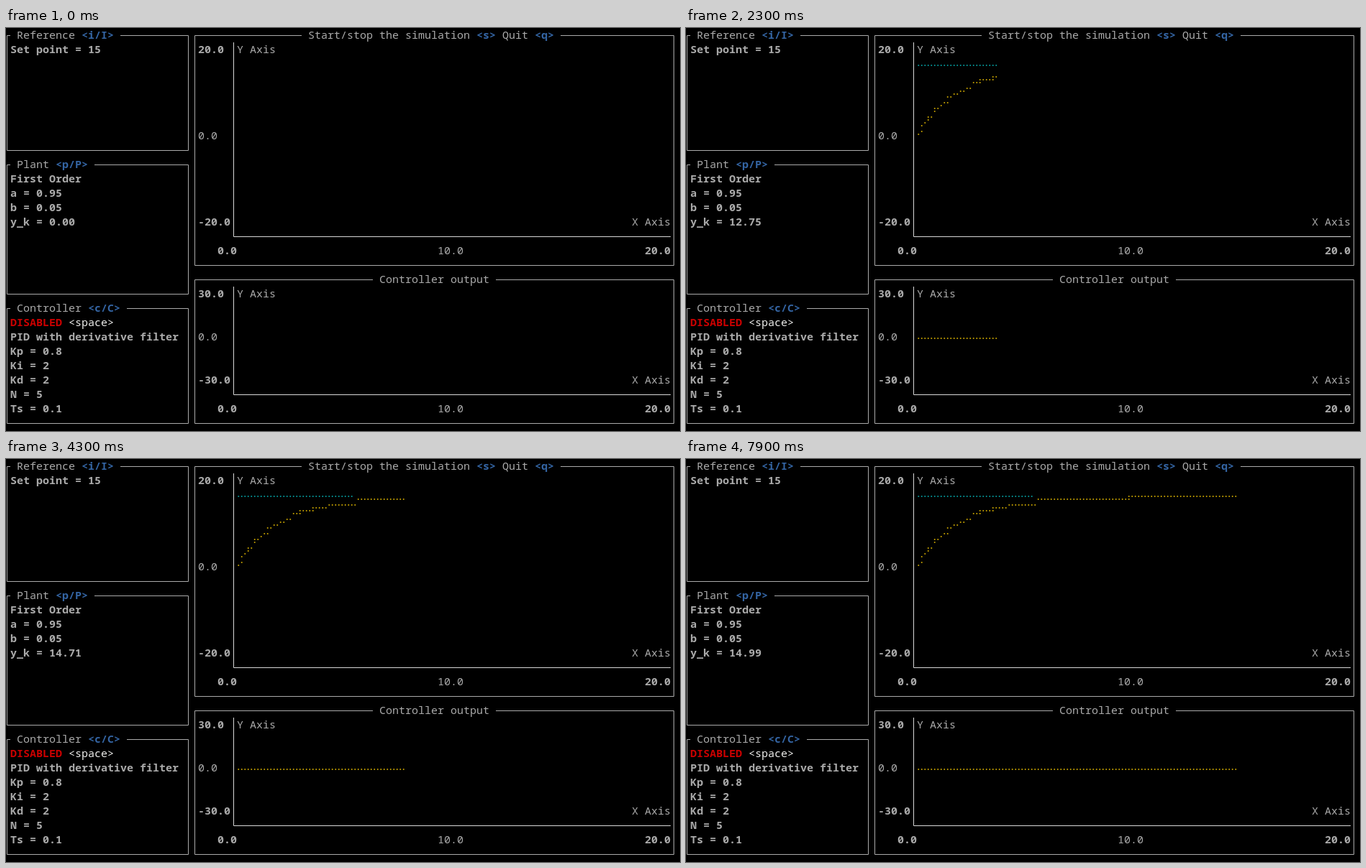
Recreate the animation shown at these times as an HTML page. Size 937 by 561 pixels, loop 8000 ms.

```html
<!DOCTYPE html>
<html lang="en">
<head>
<meta charset="utf-8">
<title>Control simulation</title>
<style>
html, body { margin: 0; width: 100%; height: 100%; overflow: hidden; background: #000; }
svg { display: block; }
text { font: 15px "Noto Sans Mono", "DejaVu Sans Mono", monospace; fill: #aaa; white-space: pre; }
.b { font-weight: 600; }
.blue { fill: #3465a4; font-weight: 600; }
.red { fill: #c00; font-weight: 600; }
.white { fill: #eeeeec; }
path { fill: none; stroke: #aaa; }
.axis { stroke: #d8d8d8; }
.dots { stroke-width: 2.1; stroke-linecap: round; }
</style>
</head>
<body>
<svg id="stage" width="937" height="561" viewBox="0 0 937 561"></svg>
<script>
const CW = 9, CH = 20, LOOP = 8000, START = 500, STEP = 100;
const stage = document.getElementById('stage');
const colX = c => c * CW - 3;

function add(tag, cls, attrs) {
  const el = document.createElementNS(stage.namespaceURI, tag);
  if (cls) el.setAttribute('class', cls);
  for (const key in attrs) el.setAttribute(key, attrs[key]);
  return stage.appendChild(el);
}

function label(col, row, str, cls) {
  const el = add('text', cls, { x: colX(col), y: row * CH + 15 });
  el.textContent = str;
  return el;
}

// Title parts in angle brackets are key hints
function title(col, row, str) {
  for (const part of str.split(/(<[^>]+>)/)) {
    if (part.trim()) label(col, row, part, part[0] === '<' ? 'blue' : '');
    col += part.length;
  }
}

function panel(c0, r0, c1, r1, str, at) {
  const x0 = colX(c0) + 4.5, x1 = colX(c1) + 4.5;
  const y0 = r0 * CH + 10.5, y1 = r1 * CH + 10.5;
  add('path', '', {
    d: `M${colX(at - 1)} ${y0}H${x0}V${y1}H${x1}V${y0}H${colX(at + str.length + 1)}`
  });
  title(at, r0, str);
}

// Braille plot: two by four dots in each character cell
function chart(top, rows, max) {
  const mid = top + (rows - 1) / 2, low = top + rows - 1;
  const y = (low + 1) * CH + 10.5;
  add('path', 'axis', { d: `M316.5 ${top * CH}V${y}H924` });
  label(30, top, max + '.0', 'b');
  label(30, mid, '0.0');
  label(30, low, `-${max}.0`, 'b');
  label(36, top, 'Y Axis');
  label(97, low, 'X Axis');
  label(33, low + 2, '0.0', 'b');
  label(67, low + 2, '10.0');
  label(99, low + 2, '20.0', 'b');
  return {
    dot: (i, v) => ({
      col: Math.round(i * 0.1 * 133 / 20),
      row: Math.round((max - v) * (rows * 4 - 1) / (2 * max))
    }),
    draw: dots => dots.map(({ col, row }) => {
      const x = colX(36) + 2.25 + col * 4.5;
      const y = (top + (row >> 2)) * CH + 4 + (row & 3) * 4;
      return `M${x} ${y}h0`;
    }).join('')
  };
}

panel(0, 0, 28, 8, 'Reference <i/I>', 2);
panel(0, 9, 28, 18, 'Plant <p/P>', 2);
panel(0, 19, 28, 27, 'Controller <c/C>', 2);
panel(29, 0, 103, 16, 'Start/stop the simulation <s> Quit <q>', 47);
panel(29, 17, 103, 27, 'Controller output', 58);

label(1, 1, 'Set point = 15', 'b');
['First Order', 'a = 0.95', 'b = 0.05'].forEach((s, i) => label(1, 10 + i, s, 'b'));
const state = label(1, 13, '', 'b');
label(1, 20, 'DISABLED', 'red');
label(10, 20, '<space>', 'white');
['PID with derivative filter', 'Kp = 0.8', 'Ki = 2', 'Kd = 2', 'N = 5', 'Ts = 0.1']
  .forEach((s, i) => label(1, 21 + i, s, 'b'));

const plant = chart(1, 13, 20);
const output = chart(18, 7, 30);
const refPath = add('path', 'dots', { style: 'stroke:#06989a' });
const plantPath = add('path', 'dots', { style: 'stroke:#c4a000' });
const outPath = add('path', 'dots', { style: 'stroke:#c4a000' });

const level = k => 15 * (1 - 0.95 ** k);
const cellOf = d => (d.row >> 2) * 100 + (d.col >> 1);

// Two samples per step, with one late sample along the way
function samples(t) {
  if (t < START) return 0;
  const n = Math.floor((t - START) / STEP);
  return 2 * n + (n < 40 ? 1 : 0);
}

let shown = -1;
function render(t) {
  const k = samples(t);
  if (k === shown) return;
  shown = k;
  const ids = Array.from({ length: k }, (_, i) => i);
  const curve = ids.map(i => plant.dot(i, level(i + 1)));
  const taken = new Set(curve.map(cellOf));
  // The curve takes over any cell it shares with the set point
  const ref = ids.map(i => plant.dot(i, 15)).filter(d => !taken.has(cellOf(d)));
  refPath.setAttribute('d', plant.draw(ref));
  plantPath.setAttribute('d', plant.draw(curve));
  outPath.setAttribute('d', output.draw(ids.map(i => output.dot(i, 0))));
  state.textContent = 'y_k = ' + level(k).toFixed(2);
}

const begin = performance.now();
function tick() {
  render((performance.now() - begin) % LOOP);
  requestAnimationFrame(tick);
}
tick();
</script>
</body>
</html>
```
